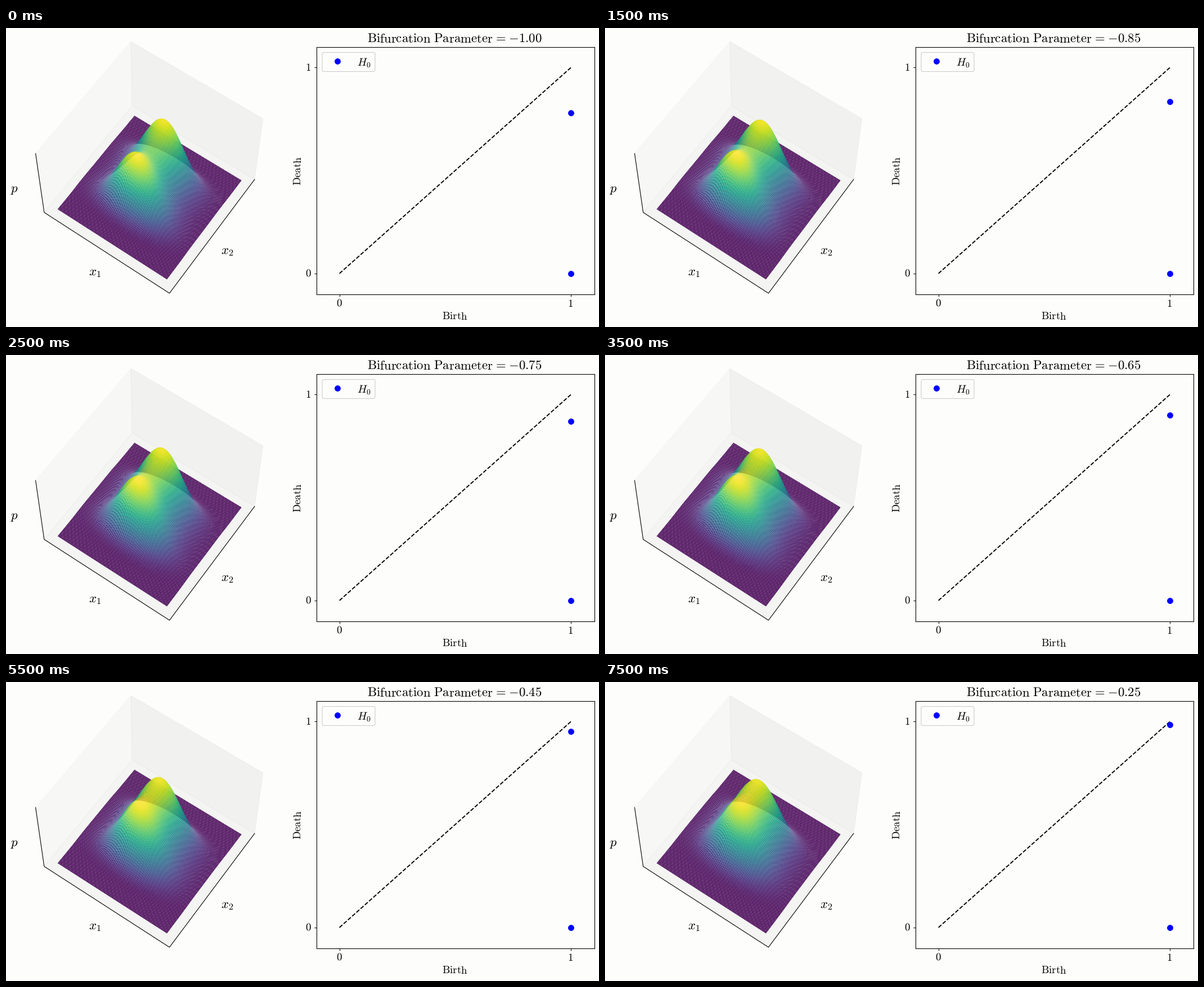
A matplotlib script that plays this animation: 1054x532 px, repeating every 8000 ms.

```python
import numpy as np
import matplotlib.pyplot as plt
from matplotlib.animation import FuncAnimation
from matplotlib.collections import PolyCollection
from matplotlib.patches import FancyBboxPatch

W, H, DPI = 1054, 532, 64
FRAMES, INTERVAL = 16, 500
CELLS, REACH = 150, 3.0
BACK = "#fdfdfb"

# Camera and half sizes of the 3D box
ELEV, AZIM, DIST = np.radians(60), np.radians(-55), 10
CENTER, SCALE = (256.2, 247.4), (234.4, 238)
SIDE, TALL = 0.595, 0.4464

plt.rcParams["mathtext.fontset"] = "cm"
plt.rcParams["text.hinting"] = "none"


def px(n):
    """Pixels to points."""
    return n * 72 / DPI


def project(x, y, z):
    """World position to stage pixels and depth toward the viewer."""
    se, ce = np.sin(ELEV), np.cos(ELEV)
    sa, ca = np.sin(AZIM), np.cos(AZIM)
    along = ca * x + sa * y
    depth = ce * along + se * z
    zoom = DIST / (DIST - depth)
    right = (ca * y - sa * x) * zoom
    up = (ce * z - se * along) * zoom
    return CENTER[0] + SCALE[0] * right, CENTER[1] - SCALE[1] * up, depth


def density(h):
    """Stationary density of the noisy oscillator, scaled to a peak of 1."""
    p = np.exp(-(X1**2 / 2 + h * X2**2 / 2 + X2**4 / 4))
    return p / p.max()


def quads(a):
    """Corner values of each grid cell, shape (cells, 4)."""
    cells = a[:-1, :-1], a[1:, :-1], a[1:, 1:], a[:-1, 1:]
    return np.stack([c.ravel() for c in cells], axis=1)


grid = np.linspace(-REACH, REACH, CELLS + 1)
X1, X2 = np.meshgrid(grid, grid)

fig = plt.figure(figsize=(W / DPI, H / DPI), dpi=DPI, facecolor=BACK)
stage = fig.add_axes([0, 0, 1, 1], zorder=2)
stage.set(xlim=(0, W), ylim=(H, 0))
stage.axis("off")


def label(x, y, text, size, ha="center", **kw):
    kw.setdefault("va", "baseline")
    return stage.text(x, y, text, fontsize=px(size), ha=ha, zorder=5, **kw)


def corners(*signs):
    pts = np.array(signs) * [SIDE, SIDE, TALL]
    return np.column_stack(project(*pts.T)[:2])


# Panes: left wall, back wall, floor
panes = [
    (0.95, [(-1, -1, -1), (-1, 1, -1), (-1, 1, 1), (-1, -1, 1)]),
    (0.90, [(-1, 1, -1), (1, 1, -1), (1, 1, 1), (-1, 1, 1)]),
    (0.925, [(-1, -1, -1), (1, -1, -1), (1, 1, -1), (-1, 1, -1)]),
]
for gray, signs in panes:
    tone = (gray, gray, gray, 0.5)
    stage.fill(*corners(*signs).T, facecolor=tone, edgecolor=tone, lw=px(1))

edges = corners((-1, -1, 1), (-1, -1, -1), (1, -1, -1), (1, 1, -1))
stage.plot(*edges.T, color="black", lw=px(1.1), zorder=2)

surface = PolyCollection([], linewidths=0, edgecolors="none",
                         antialiaseds=True, zorder=3)
stage.add_collection(surface, autolim=False)

label(15.5, 291.5, "$p$", 23)
label(158, 440.5, "$x_1$", 23)
label(393, 402.5, "$x_2$", 23)

# Persistence diagram
left, top, right, bottom = 551.5, 33.5, 1045.5, 473.5
chart = fig.add_axes([left / W, 1 - bottom / H,
                      (right - left) / W, (bottom - top) / H], facecolor=BACK)
chart.set(xlim=(-0.1, 1.1), ylim=(-0.1, 1.1), xticks=[0, 1], yticks=[0, 1],
          xticklabels=[], yticklabels=[])
chart.tick_params(length=px(4), width=px(1))
for spine in chart.spines.values():
    spine.set_linewidth(px(1.1))
chart.plot([0, 1], [0, 1], "--", color="black", lw=px(1.9))
points, = chart.plot([], [], "o", color="blue", ms=px(9.8), mew=px(1))

stage.add_patch(FancyBboxPatch((565.5, 47), 87, 27, facecolor=BACK,
                               boxstyle="round,pad=3.5,rounding_size=3.5",
                               edgecolor="0.8", lw=px(1.1), zorder=3))
stage.plot(589, 59.2, "o", color="blue", ms=px(9.8), mew=px(1), zorder=4)
label(624.5, 66, "$H_0$", 19.5, ha="left")

for v in (0, 1):
    label(592.5 + 411 * v, 496, f"${v}$", 19)
    label(542.5, 437 - 366.6 * v, f"${v}$", 19, ha="right", va="center")
label(797.5, 519, r"$\mathrm{Birth}$", 19)
label(520, 253.5, r"$\mathrm{Death}$", 19, va="center", rotation=90)
title = label(797.5, 26, "", 22.8)


def draw(i):
    h = -1 + 0.05 * i
    p = density(h)

    flat = SIDE * 0.96 / 1.1 / REACH
    x, y, depth = project(X1 * flat, X2 * flat, 0.96 * TALL * (2 * p - 1))
    order = np.argsort(quads(depth).mean(axis=1))
    surface.set_verts(np.stack([quads(x), quads(y)], axis=2)[order])
    tint = quads(p).mean(axis=1)
    tint = (tint - tint.min()) / np.ptp(tint)
    surface.set_facecolor(plt.cm.viridis(tint[order]))

    points.set_data([1, 1], [0, np.exp(-h * h / 4)])
    title.set_text(r"$\mathrm{Bifurcation\ Parameter}"
                   rf"\hspace{{0.08}}=\hspace{{0.08}}{{-}}{abs(h):.2f}$")
    return surface, points, title


anim = FuncAnimation(fig, draw, frames=FRAMES, interval=INTERVAL,
                     repeat=True, repeat_delay=0, blit=False)
plt.show()
```
